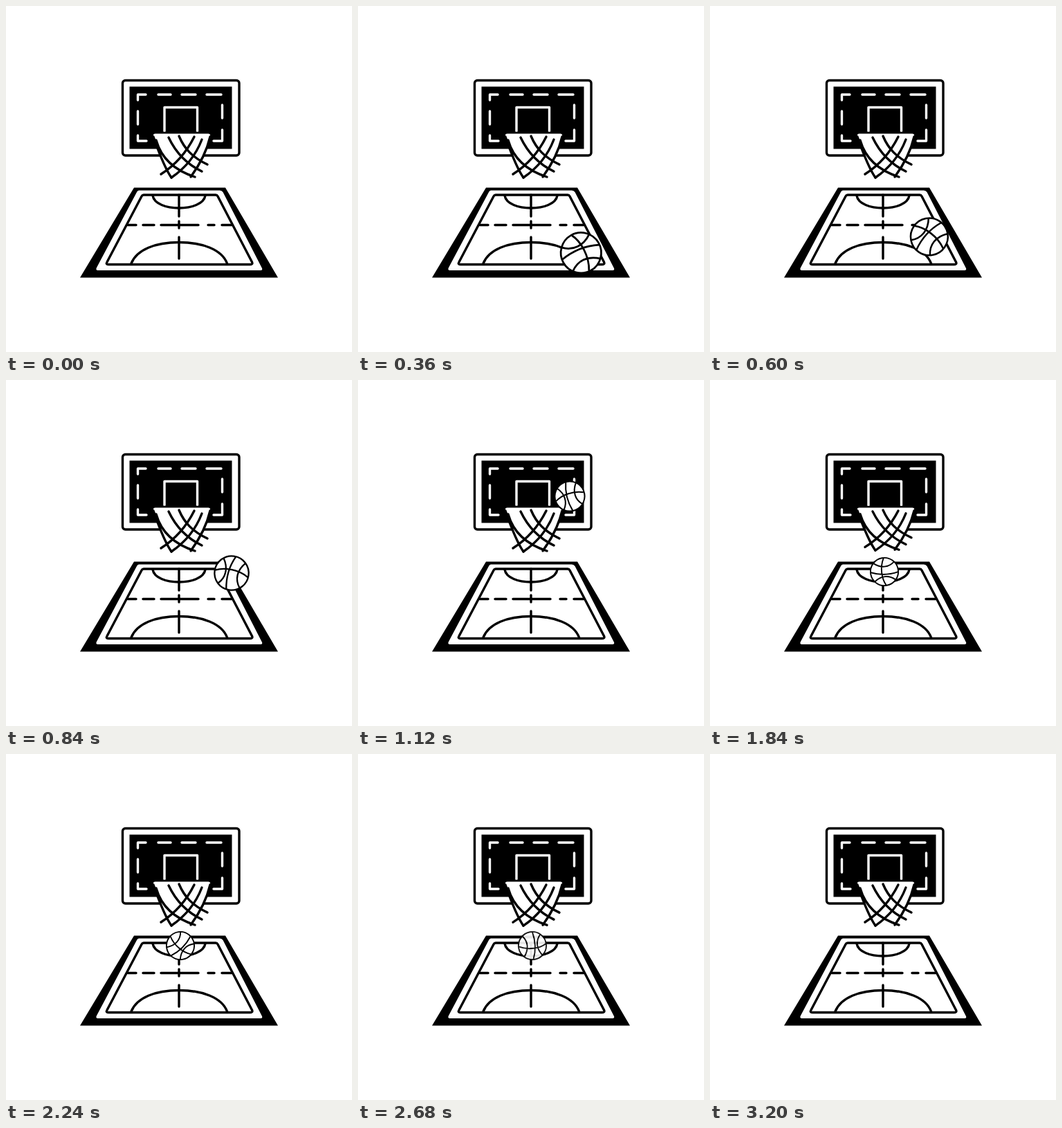
Write an HTML page that moves like this. It is 500 px wide and 500 px high and loops after 3.24 s.

```html
<!DOCTYPE html>
<html lang="en">
<head>
<meta charset="utf-8">
<title>Basketball shot</title>
<style>
html, body { margin: 0; height: 100%; overflow: hidden; background: #fff; }
svg { display: block; width: 100%; height: 100%; }
.line { fill: none; stroke: #000; stroke-width: 3.4; stroke-linecap: round; stroke-linejoin: round; }
.light { stroke: #fff; }
.white { fill: #fff; }
#ball { fill: none; stroke: #000; stroke-width: 2.7; }
</style>
</head>
<body>
<svg id="stage" viewBox="0 0 500 500">
  <g id="court">
    <path d="M185 262.500H317L393 392.500H107Z"/>
    <path class="white" d="M192 266.500H309Q312 266.500 313.500 269L370 379Q371 382 368 382H133Q129 382 131 378L189 269Q190 266.500 192 266.500Z"/>
    <path class="line" d="M199 273H303Q305 273 306 275L355.500 370Q357 373.500 353 373.500H148Q144 373.500 146 370L196 275Q197 273 199 273Z"/>
    <path class="line" d="M212 274C216 298 284 298 288 274M181 372C189 352 216 341.500 250 341.500S312 352 319.500 372"/>
    <path class="line" d="M250 273V304M250 311V321M250 334V365"/>
    <path class="line" d="M176 316.500H188M198 316.500H214M224 316.500H278M292 316.500H301M312 316.500H326"/>
  </g>
  <g id="board">
    <rect class="line" x="168.500" y="107.500" width="168.500" height="108.500" rx="4"/>
    <rect x="178.500" y="116.500" width="148" height="90"/>
    <path class="line light" d="M190.500 136V128H202M220 128H238M254 128H274M290 128H311M312.500 143V162M312.500 179V195H300M190.500 152V171M190.500 187V195H203"/>
    <path class="line light" d="M229 181V146.500H276.500V181"/>
  </g>
  <g id="net">
    <path class="line" d="M214 183.500H294"/>
    <path class="white" d="M216 184.500H292Q296 184.500 295 188C291 206 283 225 267 247L253 238L239 248C230 235 221 212 213 188Q212 184.500 216 184.500Z"/>
    <path class="line" d="M213 189C221 212 230 235 239 248M217 194C225 222 245 238 273 247M235 190C245 211 260 228 283 239M250 188C258 207 270 219 291 229"/>
    <path class="line" d="M295 189C291 206 283 225 267 247M283 193C275 214 261 233 239 248M272 189C262 209 246 229 224 243"/>
  </g>
  <g id="ball">
    <circle class="white" r="28.700"/>
    <path d="M-28 -1C-14 -8 10 -8 28 3M3 -28C-6 -10 -8 10 -5 28M-17 -23C-7 -8 -8 8 -20 20M21 -20C8 -6 7 10 17 23"/>
  </g>
</svg>
<script>
const LOOP = 3240, STEP = 40, APEX = 1240, LAND = 1840;
const stage = document.getElementById('stage');
const net = document.getElementById('net');
const ball = document.getElementById('ball');

// time, x, y, radius
const keys = [
  [0, 360, 416, 33.5],
  [360, 322.3, 356.7, 30.5],
  [560, 316, 340, 28.5],
  [840, 326, 279, 25.8],
  [1120, 306, 168, 22.5],
  [1240, 284, 140, 21.5],
  [1400, 259, 182, 20.6],
  [LAND, 252, 277, 21]
];
const clamp = v => Math.max(0, Math.min(1, v));

function slope(i, c) {
  const a = keys[Math.max(0, i - 1)], b = keys[Math.min(keys.length - 1, i + 1)];
  return (b[c] - a[c]) / (b[0] - a[0]);
}

// Smooth curve through the keys, tangents taken from the neighbours.
function flight(t) {
  const i = Math.max(0, keys.findIndex(k => k[0] > t) - 1);
  const a = keys[i], b = keys[i + 1], span = b[0] - a[0], u = (t - a[0]) / span;
  return [1, 2, 3].map(c => {
    const m = slope(i, c) * span, n = slope(i + 1, c) * span, d = b[c] - a[c];
    return a[c] + u * (m + u * (3 * d - 2 * m - n + u * (m + n - 2 * d)));
  });
}

function hop(t, start, length, height) {
  const u = clamp((t - start) / length);
  return 4 * height * u * (1 - u);
}

function settle(t) {
  const lift = hop(t, LAND, 400, 14) + hop(t, LAND + 400, 260, 5);
  return [252, 277 - lift, 21];
}

function draw(t) {
  const [x, y, r] = t < LAND ? flight(t) : settle(t);
  const angle = 99 - 0.108 * t;
  ball.setAttribute('transform', `translate(${x} ${y}) rotate(${angle}) scale(${r / 30})`);
  ball.setAttribute('opacity', Math.min(clamp(t / 160), clamp((3040 - t) / 400)));

  // The ball drops behind the net once it is past the top of its arc.
  const top = t < APEX ? ball : net;
  if (stage.lastElementChild !== top) stage.append(top);

  const u = Math.max(0, t - 1400);
  const stretch = 1 + 0.1 * Math.exp(-u / 350) * Math.sin(2 * Math.PI * u / 560);
  net.setAttribute('transform', `translate(0 185) scale(1 ${stretch}) translate(0 -185)`);
}

const begin = performance.now();
function tick() {
  const t = (performance.now() - begin) % LOOP;
  draw(Math.floor(t / STEP) * STEP);
  requestAnimationFrame(tick);
}
tick();
</script>
</body>
</html>
```
